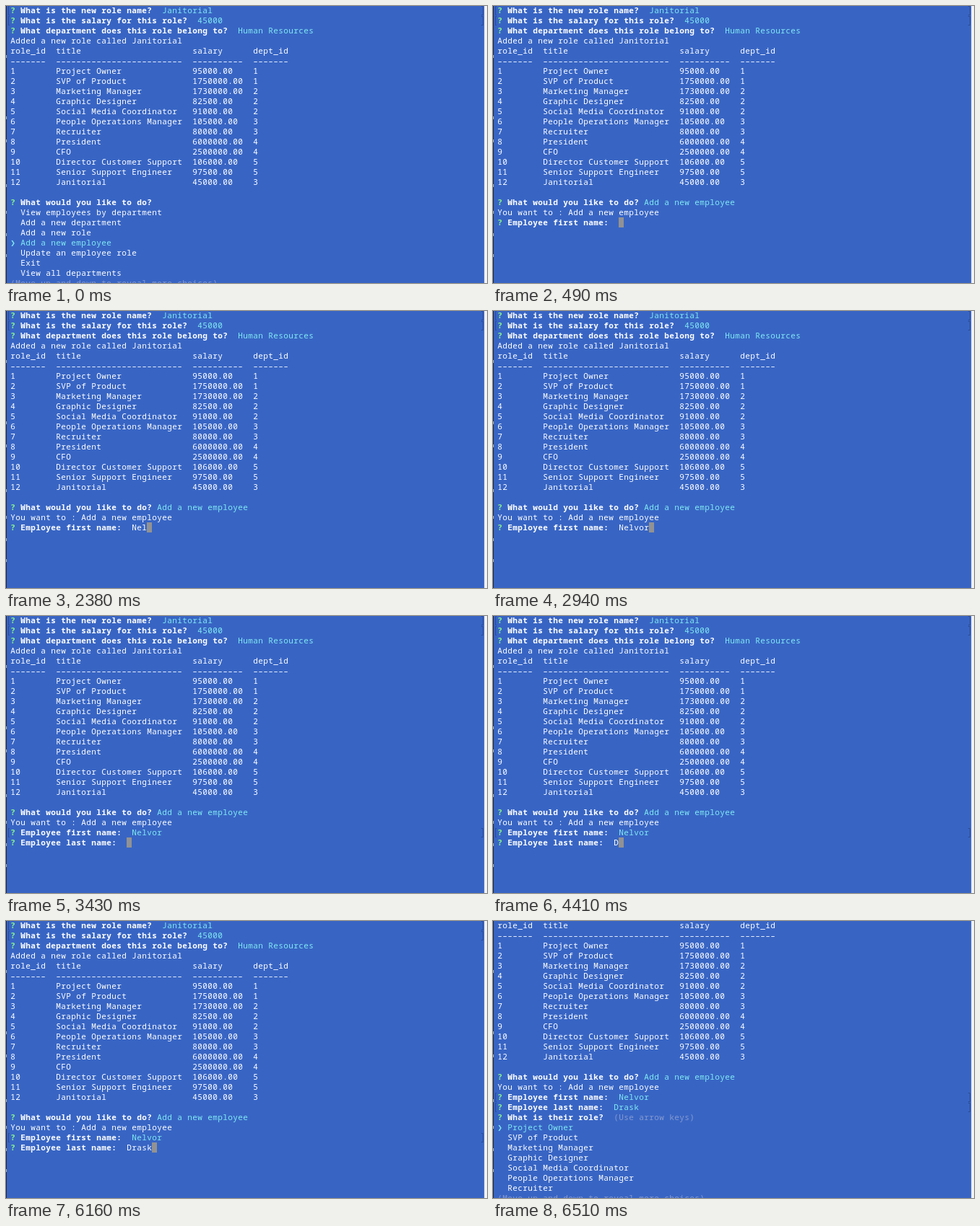
Write an HTML page that moves like this. It is 666 px wide and 384 px high and loops after 8000 ms.

```html
<!DOCTYPE html>
<html lang="en">
<head>
<meta charset="utf-8">
<title>Employee tracker terminal</title>
<style>
  html, body { margin: 0; width: 100%; height: 100%; overflow: hidden; background: #3865c4; }
  svg { display: block; }
  text {
    font: 500 11px "Noto Sans Mono", "DejaVu Sans Mono", monospace;
    letter-spacing: 0.4px;
    white-space: pre;
    fill: #fff;
  }
  .bold { font-weight: 700; }
  .cyan { fill: #80e9f2; }
  .green { fill: #86f48c; font-weight: 700; }
  .dim { fill: #8699cf; }
  .pointer { fill: #80e9f2; font-family: "DejaVu Sans Mono", monospace; }
  .cursor { fill: #929292; }
  .mark { fill: none; stroke: #294b9b; }
</style>
</head>
<body>
<svg width="666" height="384" viewBox="0 0 666 384">
  <rect width="666" height="384" fill="#3865c4"/>
  <g id="screen"></g>
  <g id="edges">
    <rect width="1" height="384" fill="#20263a"/>
    <rect x="662" width="1" height="384" fill="#c9d0e2"/>
    <rect x="663" width="3" height="384" fill="#f4f4f6"/>
  </g>
</svg>
<script>
const LOOP = 8000, CELL = 7, LINE = 14, LEFT = 6;
const FIRST = "Nelvor", LAST = "Drask";
const ROLES = [
  ["Project Owner", "95000.00", 1],
  ["SVP of Product", "1750000.00", 1],
  ["Marketing Manager", "1730000.00", 2],
  ["Graphic Designer", "82500.00", 2],
  ["Social Media Coordinator", "91000.00", 2],
  ["People Operations Manager", "105000.00", 3],
  ["Recruiter", "80000.00", 3],
  ["President", "6000000.00", 4],
  ["CFO", "2500000.00", 4],
  ["Director Customer Support", "106000.00", 5],
  ["Senior Support Engineer", "97500.00", 5],
  ["Janitorial", "45000.00", 3]
];
const ACTIONS = ["View employees by department", "Add a new department", "Add a new role",
  "Add a new employee", "Update an employee role", "Exit", "View all departments"];
const MENU_END = 490, ENTER_FIRST = 3360, ASK_LAST = 3430, ENTER_LAST = 6510;
const FIRST_KEYS = [2100, 2310, 2380, 2660, 2800, 2940];
const LAST_KEYS = [4410, 4620, 4760, 4970, 5110];
const ERASE = 5810, RETYPE = 6160;

const screen = document.getElementById("screen");
const before = (keys, t) => keys.filter(k => k <= t).length;

const put = (row, col, str, cls = "") =>
  `<text x="${LEFT + col * CELL + 0.2}" y="${row * LINE + 10}" class="${cls}">${str}</text>`;

const cursor = (row, col) =>
  `<rect class="cursor" x="${LEFT + col * CELL}" y="${row * LINE - 1}" width="7" height="14"/>`;

const mark = row => {
  const y = row * LINE + 0.5;
  return `<path class="mark" d="M5 ${y}H3.5v12H5M658 ${y}h2.5v12H658"/>`;
};

const ask = (row, question, answer = "", cls = "cyan", gap = 2) =>
  put(row, 0, "?", "green") + put(row, 2, question, "bold") +
  put(row, 2 + question.length + gap, answer, cls);

const tableRow = (row, cells) =>
  cells.map((cell, i) => put(row, [0, 9, 36, 48][i], cell)).join("");

const menu = (row, items, selected) =>
  items.map((item, i) => i === selected
    ? put(row + i, 0, "❯", "pointer") + put(row + i, 2, item, "cyan")
    : put(row + i, 2, item)).join("") +
  put(row + items.length, 0, "(Move up and down to reveal more choices)", "dim");

// Typing field: plain text followed by the block cursor.
const field = (row, question, typed) =>
  ask(row, question, typed, "") + cursor(row, question.length + 4 + typed.length);

const history = [
  mark(0), mark(1),
  ask(0, "What is the new role name?", "Janitorial"),
  ask(1, "What is the salary for this role?", "45000"),
  ask(2, "What department does this role belong to?", "Human Resources"),
  put(3, 0, "Added a new role called Janitorial"),
  tableRow(4, ["role_id", "title", "salary", "dept_id"]),
  tableRow(5, [7, 25, 10, 7].map(n => "–".repeat(n))),
  ...ROLES.map(([title, salary, dept], i) => tableRow(6 + i, [i + 1, title, salary, dept]))
].join("");

function content(t) {
  const todo = "What would you like to do?";
  if (t < MENU_END) return history + ask(19, todo) + menu(20, ACTIONS, 3);

  let out = history + ask(19, todo, ACTIONS[3], "cyan", 1) +
    put(20, 0, "You want to : " + ACTIONS[3]);
  const firstQ = "Employee first name:", lastQ = "Employee last name:";
  if (t < ENTER_FIRST) return out + field(21, firstQ, FIRST.slice(0, before(FIRST_KEYS, t)));

  out += mark(21) + ask(21, firstQ, FIRST);
  if (t < ASK_LAST) return out + cursor(22, 0);
  if (t < ENTER_LAST) {
    const erased = t >= ERASE && t < RETYPE ? 1 : 0;
    return out + field(22, lastQ, LAST.slice(0, before(LAST_KEYS, t) - erased));
  }
  return out + mark(22) + ask(22, lastQ, LAST) +
    ask(23, "What is their role?", "(Use arrow keys)", "dim") +
    menu(24, ROLES.slice(0, 7).map(role => role[0]), 0);
}

// Slivers of the window behind, along the left edge.
document.getElementById("edges").innerHTML += [68, 153, 185, 247, 284, 315, 344]
  .map(y => `<rect y="${y}" width="1" height="4" fill="#a9aa9c"/>`).join("");

let shown = "";
function draw(t) {
  const markup = content(t);
  if (markup === shown) return;
  shown = markup;
  screen.innerHTML = markup;
  screen.setAttribute("transform", `translate(0 ${t < ENTER_LAST ? 0 : -4 * LINE})`);
}

const start = performance.now();
function tick(now) {
  draw(Math.max(0, now - start) % LOOP);
  requestAnimationFrame(tick);
}
draw(0);
requestAnimationFrame(tick);
</script>
</body>
</html>
```
